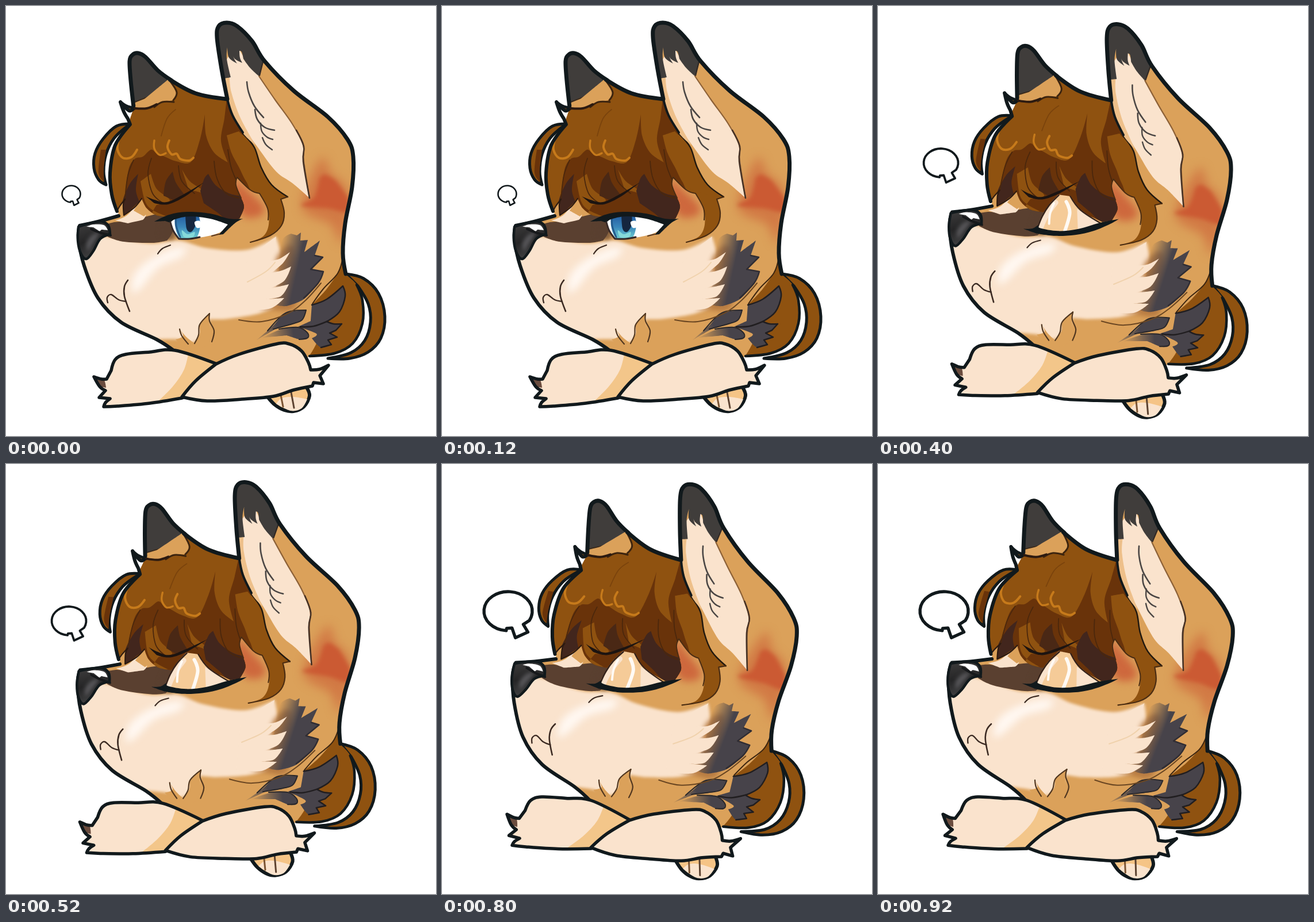
These frames come from a looping animation (748 by 748 pixels, 1000 ms). An HTML page with a canvas:

```html
<!DOCTYPE html>
<html lang="en">
<head>
<meta charset="utf-8">
<title>Huffing fox</title>
<style>
html, body { margin: 0; width: 100%; height: 100%; overflow: hidden; background: #fff; }
canvas { display: block; width: 100vw; height: 100vh; }
</style>
</head>
<body>
<canvas id="stage" width="748" height="748"></canvas>
<script>
const ctx = document.getElementById('stage').getContext('2d');

const INK = '#11191c', FUR = '#dba15a', CREAM = '#fae3cd', PEACH = '#f3c68a';
const HAIR = '#8f5210', SHADE = '#69330a', DEEP = '#42261d', GLOW = '#c67a1b';
const CHAR = '#403d3b', SLATE = '#47434a', BARK = '#5a4030', BLUSH = '#cb5a33';

// Smooth curve through "x,y" points; "!" marks a corner, a final "z" closes it.
function spline(text) {
  const closed = text.endsWith('z');
  const pts = text.replace('z', '').trim().split(/\s+/).map(s => {
    const [x, y] = s.split(',').map(parseFloat);
    return { x, y, corner: s.endsWith('!') };
  });
  const n = pts.length;
  const tangent = i => {
    const p = pts[i % n];
    if (p.corner || (!closed && (i === 0 || i === n - 1))) return [0, 0];
    const a = pts[(i + n - 1) % n], b = pts[(i + 1) % n];
    return [(b.x - a.x) / 6, (b.y - a.y) / 6];
  };
  const path = new Path2D();
  path.moveTo(pts[0].x, pts[0].y);
  for (let i = 0; i < (closed ? n : n - 1); i++) {
    const p = pts[i], q = pts[(i + 1) % n], u = tangent(i), v = tangent(i + 1);
    path.bezierCurveTo(p.x + u[0], p.y + u[1], q.x - v[0], q.y - v[1], q.x, q.y);
  }
  if (closed) path.closePath();
  return path;
}

const cache = new Map();
function shape(text) {
  if (!cache.has(text)) cache.set(text, spline(text));
  return cache.get(text);
}
function fill(color, text) {
  ctx.fillStyle = color;
  ctx.fill(shape(text));
}
function line(width, text, color = INK) {
  ctx.lineWidth = width;
  ctx.strokeStyle = color;
  ctx.stroke(shape(text));
}
function outlined(color, width, text) {
  fill(color, text);
  line(width, text);
}
function soft(color, blur, text) {
  ctx.filter = `blur(${blur}px)`;
  fill(color, text);
  ctx.filter = 'none';
}
function within(text, draw) {
  ctx.save();
  ctx.clip(shape(text));
  draw();
  ctx.restore();
}
function fade(x0, y0, x1, y1, ...colors) {
  const g = ctx.createLinearGradient(x0, y0, x1, y1);
  colors.forEach((c, i) => g.addColorStop(i / (colors.length - 1), c));
  return g;
}

const HEAD = '283,127! 330,152 385,162! 375,110 367,55 370,35 384,29 402,35 428,61 450,96 500,147 560,193 594,232 604,262 602,315 590,378 586,430 591,466! 575,540 530,608 440,625 340,622 290,600 262,580 200,550 160,508 136,452 127,405 128,382! 160,375 196,362! 186,330 181,290 187,245 212,207! 225,175!z';
const MANE = '199,167! 224,178! 245,179 265,169 291,164! 297,150 283,127! 330,152 385,162! 394,190 412,220 432,246 444,281 462,311 490,332! 478,336! 484,360 479,382 460,399 425,411! 448,400 457,380 455,352 441,326! 425,320 402,298! 400,312 409,334! 414,350 406,370! 390,374! 355,363 310,360 285,367! 262,364 245,352 236,335! 224,350 205,364! 204,345 207,336! 198,348 193,357! 184,330 181,290 187,245 212,207! 220,184!z';

function farEar() {
  const ear = '222,176! 217,130 215,96 220,85 230,82 243,89 264,112 287,129! 300,165!z';
  fill(FUR, ear);
  within(ear, () => {
    fill(CHAR, '205,70! 300,90! 300,145! 262,153 222,168! 205,170!z');
    line(2, '222,168 262,153 292,148', '#3a2a1c');
  });
  line(7, '222,176! 217,130 215,96 220,85 230,82 243,89 264,112 287,129!');
}

function face() {
  fill(FUR, HEAD);
  within(HEAD, () => {
    soft(CREAM, 2.5, '110,398! 183,402 250,413 300,408 350,421 420,424 470,401! 478,430 488,480 480,515 440,535 378,545! 354,545! 346,572 322,586 300,580 262,580! 200,575 110,540!z');
    soft('#fff8f2', 7, '222,470 245,445 285,424 312,420 305,436 265,455 235,490 220,498z');
    soft('#b77b42', 4, '470,440 500,420 505,520 462,528 440,520 470,492z');
    fill(fade(468, 460, 505, 468, 'rgba(71,67,74,0)', SLATE),
      '478,412 496,396! 506,399! 513,394! 512,408! 525,407! 519,428! 546,408! 537,434! 551,437! 530,458! 552,462! 543,482 518,510 488,522! 465,515 474,470z');
    line(2.5, '537,434! 551,437! 530,458! 552,462! 543,482 518,508', '#302d33');
    fill(CREAM, '415,450! 445,420 470,401! 465,428 455,444! 475,440 494,428! 482,447 462,464! 480,460 496,453! 484,478 456,492! 475,488 492,484! 478,505 450,510! 468,509 484,508! 460,526 415,530!z');
    line(2, '420,480 452,462 468,446', '#f0d2ad');

    // chin tufts
    fill(FUR, '295,580! 308,574 302,562! 314,576 328,587! 337,570 338,553 355,535! 354,555 360,586! 320,605!z');
    line(2.2, '302,562 306,574 317,588', '#50361f');
    line(2.2, '328,587 335,572 337,554 354,535', '#50361f');
    line(2.2, '354,535 354,548 362,565 358,584', '#50361f');

    soft('rgba(203,90,51,.55)', 9, '548,265 566,292 592,315 596,365 582,412 565,380 515,350z');
    soft(BLUSH, 3.5, '545,300! 555,293 573,303! 595,332! 594,358 560,352 514,347 536,333z');
    soft('rgba(205,98,58,.9)', 7, '396,302 425,325 448,348 444,364 418,368 404,350z');

    fill(BARK, '158,385! 188,376 215,374 262,362 292,362 290,392 280,408! 255,412 205,410 178,402!z');
    fill(CREAM, '190,373! 213,362 238,328! 244,360 238,372! 212,378!z');
    fill(FUR, '222,356! 237,332! 247,360! 240,366!z');
    soft('rgba(90,64,48,.65)', 3, '275,365 296,365 294,402 280,406 266,398z');
  });
  line(2.4, '177,516! 176,507 183,502 196,511 209,514', '#3b2a22');
  line(2.6, '212,477 206,488 206,505 215,531', '#3b2a22');
  line(2.2, '264,431 272,422 286,416', '#3b2a22');
}

function nose() {
  const pad = '126,384! 145,378 166,375 178,382 181,397! 164,405 152,426 140,440 130,430 125,408z';
  fill(fade(130, 380, 150, 440, '#3c3b3b', '#252526', '#434344'), pad);
  soft('#555457', 3, '140,412 150,398 162,396 150,416 142,426z');
  fill('#fff', '140,384! 152,380 170,381 177,390! 166,389! 163,392! 152,385!z');
  line(4, '148,388! 163,394 182,399', '#17191b');
  line(4.5, pad);
}

function ponytail() {
  outlined(HAIR, 5, '591,466! 622,474 648,500 659,540 652,578 630,602 598,613 560,613! 600,603 624,582 634,550 630,518 612,487!z');
  fill(HAIR, '588,435! 592,468! 611,486 620,515 619,555 602,588 570,605 528,608! 545,570 532,520! 558,492 578,462z');
  line(4.5, '610,485! 620,512 620,552 603,587 572,604 528,609');
  line(2, '586,437 577,465 552,492 533,518', '#3c2510');
  fill(SLATE, '532,520! 558,510 586,487! 590,505 580,532 560,548! 570,553 584,553! 574,564! 563,569! 576,576! 560,581! 566,589! 548,594 532,578! 540,570 508,558! 530,548!z');
  line(2.5, '532,520! 558,510 586,487! 590,505 580,532 558,549! 570,553 584,553! 574,564! 563,569! 576,576! 560,581! 566,589! 548,594', '#211e20');
  line(2.5, '512,558 535,557 560,548', '#211e20');
  fill(fade(438, 580, 475, 560, 'rgba(71,67,74,.2)', SLATE), '436,581! 465,556 485,535 522,529! 516,545 500,553 470,561!z');
  line(2, '455,565 478,540 495,531 522,529! 515,546 498,553 465,562', '#29272a');
  fill(fade(450, 575, 500, 568, 'rgba(71,67,74,.1)', SLATE), '446,577! 480,562 508,559 524,568 524,579 510,580! 488,573!z');
  line(2, '475,562 508,559 524,568 525,577 510,580', '#29272a');
  line(2, '405,546 445,549 490,535 520,513 548,482', '#6a4622');
}

function mane() {
  // loose side lock
  outlined(HAIR, 5, '218,205! 192,209 169,231 155,256 153,282 161,302 174,311! 170,288 174,258 188,230 211,209!z');
  fill(SHADE, '165,250! 174,250! 170,285 171,306! 161,290z');
  fill(HAIR, MANE);
  within(MANE, () => {
    fill(SHADE, '207,335! 213,285 224,266 238,262 252,250 262,256 276,262 296,270 322,271 338,230 346,188! 348,225 362,255 386,272! 374,235 380,195 384,160! 402,180 412,206 425,224! 408,226 402,250 410,285 425,320! 440,350! 400,380! 250,370! 236,336! 205,364!z');
    fill(HAIR, '384,225! 392,255 405,280 420,308 440,322! 470,330! 445,285 428,245 405,218!z');
    fill(HAIR, '252,292! 262,318 285,338 262,346! 254,365 280,366! 255,355 242,340 234,305!z');
    fill(HAIR, '306,284! 320,305 342,320 362,338! 340,325 318,320!z');
    fill(DEEP, '205,366! 203,340 215,310 230,292! 226,320 232,340!z');
    fill('#4a2815', '274,330! 278,305 290,288! 296,308 312,330! 290,337!z');
    fill(DEEP, '338,322! 345,300 352,292! 365,312 388,326 406,330! 416,350 408,372! 388,374 366,358 344,343!z');
    line(1.8, '253,265 247,292 255,326 272,342', '#4b270c');
    line(1.8, '300,278 306,305 328,326', '#4b270c');
    line(1.8, '362,270 367,300 382,325 405,334', '#4b270c');
    line(1.8, '386,250 392,282 405,312', '#4b270c');
    line(1.8, '222,268 212,295 207,335', '#4b270c');
    line(1.8, '295,180 280,196 270,226', '#7a430c');
    line(4, '196,232 194,250 203,264 218,263 228,250', GLOW);
    line(3.4, '258,234 258,248 267,259 278,256', GLOW);
    line(4, '284,234 281,246 288,258 297,257 303,266 318,269 326,264', GLOW);
  });
  line(3, '258,176 272,167 292,167', '#3c240f');
  line(2.5, '412,222 432,246 444,281 462,311 490,332', '#20180f');
  line(2.2, '490,332! 478,336! 484,360 479,382 460,399 425,411', '#4a2c12');
  line(2, '456,372 455,352 441,326! 425,320 402,298! 400,312 409,334', '#4a2c12');
  line(2.2, '236,335! 224,350 205,364! 204,345 207,336! 198,348 193,357', '#2c1a10');
  line(6, '222,178! 214,182 199,167! 205,184 212,196! 216,206! 190,242 181,290 184,328 193,357');
  line(5, '199,167! 210,174 224,178');
  line(4, '224,178 245,178 262,171', '#2c1a10');
  line(3, '291,164 297,150 285,130', '#3c240f');
}

function nearEar() {
  within(HEAD, () => {
    fill(CREAM, '376,110! 398,72 416,92 440,122 468,163 498,205 517,242 519,270 527,333! 498,308 470,288 438,246 408,203 386,162!z');
    fill('#eec08a', '378,125! 389,122! 392,150 408,195 434,242! 410,218 388,170!z');
    fill(CHAR, '360,20! 420,20! 460,70! 447,97! 440,122! 425,108 413,92! 410,80 406,78! 407,90 411,99! 398,92 394,82! 397,92 402,100! 388,90 385,72! 384,92 391,124! 380,126! 365,130!z');
    line(2.2, '447,97 441,121', '#302824');
  });
  line(2.2, '440,122 468,163 498,205 517,242 518,270 528,334', '#8d6137');
  line(2.5, '505,216 518,244 517,270 528,334', '#453125');
  line(2.6, '419,132 422,150 432,174 448,194', '#4a4644');
  line(2.6, '433,180 437,197 450,211 467,216', '#4a4644');
  line(2.4, '443,204 445,218 454,228 464,232', '#4a4644');
  line(2.4, '446,229 452,241 463,250', '#4a4644');
}

function openEye() {
  const white = '284,374! 300,367 350,362 392,377! 372,394 336,403 303,404 293,392z';
  fill('#fff', white);
  within(white, () => {
    fill(fade(0, 364, 0, 405, '#245da2', '#3a86ba', '#70d0d2'), '294,360! 334,360! 338,380 332,402 316,408 301,402 294,382z');
    line(3, '296,362 296,382 303,402', '#245a8c');
    fill('#15263f', '312,360! 330,360! 330,380 322,393 314,387z');
    fill('#86dad9', '306,390 316,397 328,393 325,402 310,402z');
    fill('#fff', '328,376 337,374 341,383 332,386z');
  });
  fill(INK, '258,375! 284,363 315,358 355,361 388,370 412,370! 398,378 378,397! 370,398! 386,380! 355,370 320,366 294,371 286,377! 277,374!z');
  line(3, '286,376 291,391 300,404', '#382a28');
  line(3, '301,405 320,405 337,402', '#33292a');
  line(2.2, '370,397 358,400', '#5b3a22');
}

function closedEye() {
  const lid = '277,397! 284,374 294,354 309,334! 330,335! 350,356 387,376! 350,394 310,402!z';
  fill('#f5cb98', lid);
  within(lid, () => {
    line(9, '284,395 292,372 306,348', CREAM);
    line(4, '303,350 298,368 298,386', '#fffaf4');
    line(6, '324,345 332,364 326,398', '#fffaf4');
    fill(CREAM, '344,356! 390,376! 350,400!z');
  });
  line(2.5, '279,394 285,374 295,354 310,335', '#33211a');
  line(2.2, '330,335 350,357 388,377', '#33211a');
  fill(INK, '254,399! 270,397 280,389! 283,395 315,397 350,390 385,376 418,366! 404,376 376,391 345,401 310,406 278,405!z');
}

function arms() {
  outlined('#f5c486', 6, '455,680! 468,694 484,703 500,705 518,697 528,678 522,662! 490,655!z');
  fill(CREAM, '470,692! 480,682 500,680 524,684! 514,700 495,704z');
  line(3, '478,677 482,697', '#7b5432');
  line(3, '496,672 501,699', '#5c4230');

  const rear = '183,634! 190,615 208,606 250,602 294,599 365,622! 380,650! 306,682! 250,691 194,696 170,697! 173,690 181,683! 162,681! 173,669! 163,662 153,645! 166,649 175,649!z';
  fill(CREAM, rear);
  within(rear, () => {
    fill(PEACH, '318,600! 380,615! 380,660! 306,684! 262,690! 290,662 310,632z');
    fill('#6a4c3e', '150,642! 169,648 174,664! 162,662!z');
  });
  line(5.5, rear);
  const front = '365,623! 405,606 470,588 493,588 514,600 526,620 530,633! 545,632 561,625! 551,637 546,643! 552,657! 535,655! 533,661! 500,668 465,679 410,684 350,687 306,680! 330,652z';
  outlined(CREAM, 5.5, front);
}

function outlines() {
  line(7, '285,128! 330,152 385,162! 375,110 367,55 370,35 384,29 402,35 428,61 450,96 500,147 560,193 594,232 604,262 602,315 590,378 586,430 591,466!');
  line(4, '385,162 394,190 412,220');
  line(6, '196,365! 160,375 128,382! 126,405 136,452 160,508 200,550 262,580 294,601');
  line(4, '290,599 320,614 365,623');
}

function puff([cx, cy, rx, ry, width]) {
  ctx.beginPath();
  ctx.ellipse(cx, cy, rx, ry, 0, 1.65, 6.78);
  for (const [u, v] of [[.63, .68], [.82, 1.07], [.3, 1.36], [.16, .86], [-.06, .88]])
    ctx.lineTo(cx + u * rx, cy + v * ry);
  ctx.closePath();
  ctx.fillStyle = '#fff';
  ctx.fill();
  ctx.lineWidth = width;
  ctx.strokeStyle = INK;
  ctx.stroke();
}

// tilt in degrees with its offset, then the puff of breath
const rest = [0, 0, 0], mid = [5.5, 38, -34], up = [8.75, 60, -51.5];
const poses = [
  { tilt: rest, puff: [113.5, 327, 16, 14.5, 2.6] },
  { tilt: rest, puff: [114.5, 326, 18, 15.5, 2.6] },
  { tilt: mid, puff: [109.5, 273, 30, 25, 3.8] },
  { tilt: up, puff: [114, 259, 35, 28.5, 4.8] },
  { tilt: up, puff: [115, 256, 42, 34, 5.4] }
];

function draw({ tilt: [deg, dx, dy], puff: breath }) {
  ctx.setTransform(1, 0, 0, 1, 0, 0);
  ctx.fillStyle = '#fff';
  ctx.fillRect(0, 0, 748, 748);
  ctx.lineJoin = ctx.lineCap = 'round';
  ctx.save();
  ctx.translate(dx, dy);
  ctx.rotate(deg * Math.PI / 180);
  farEar();
  face();
  ponytail();
  mane();
  nearEar();
  outlines();
  nose();
  if (deg) closedEye(); else openEye();
  fill('#1c1411', '243,331! 258,337 280,341 310,327 344,307! 312,331 282,345 258,343!z');
  arms();
  ctx.restore();
  puff(breath);
}

let shown = -1;
function tick() {
  const step = Math.floor(performance.now() % 1000 / 200);
  if (step !== shown) draw(poses[shown = step]);
  requestAnimationFrame(tick);
}
tick();
</script>
</body>
</html>
```
